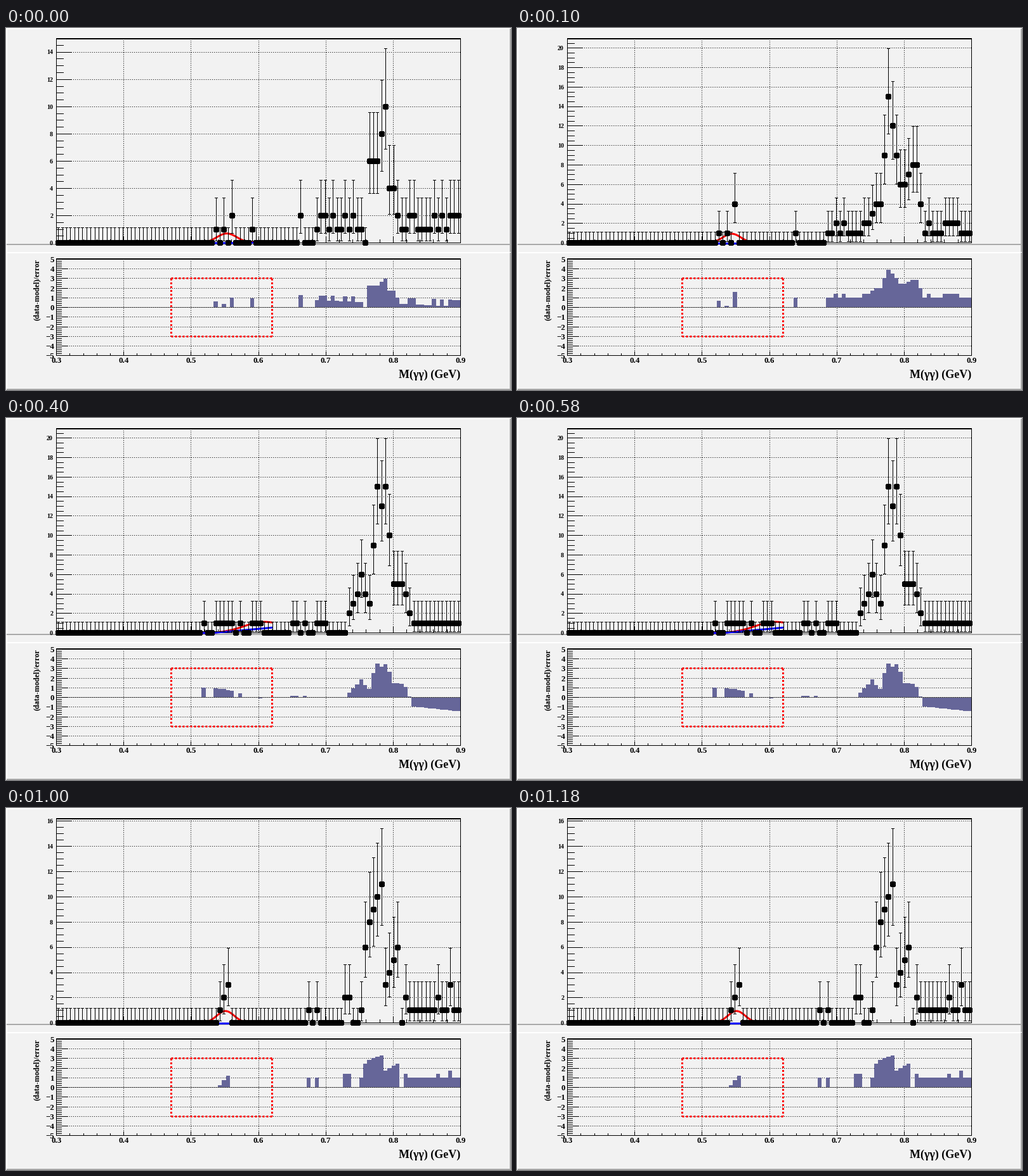
Recreate the animation shown at these times as a matplotlib script. Size 796 px wide and 572 px high, loop 1300 ms.

```python
import numpy as np
import matplotlib.pyplot as plt
from matplotlib.animation import FuncAnimation
from matplotlib.collections import EllipseCollection, LineCollection
from matplotlib.patches import Rectangle

W, H, DPI = 796, 572, 64
PAD_A, PAD_B = 0.6 * H, 0.62 * H      # end of upper pad, start of lower pad
LEFT, RIGHT = 0.1 * W, 0.9 * W
TOP, ZERO = 0.05 * PAD_A, 0.99 * PAD_A
RES_TOP, RES_BOT = PAD_B + 0.05 * (H - PAD_B), PAD_B + 0.75 * (H - PAD_B)
RES_ZERO, RES_UNIT = (RES_TOP + RES_BOT) / 2, (RES_BOT - RES_TOP) / 10
BINS = 100
STEP = (RIGHT - LEFT) / BINS
FIT_LO, FIT_HI = 0.47, 0.62
DOTTED = (0, (1, 2))

plt.rcParams["font.family"] = "Liberation Serif"
plt.rcParams["font.weight"] = "bold"

fig = plt.figure(figsize=(W / DPI, H / DPI), dpi=DPI, facecolor="#f2f2f2")
ax = fig.add_axes([0, 0, 1, 1])
ax.set(xlim=(0, W), ylim=(H, 0))
ax.axis("off")


def px(n):
    return n * 72 / DPI


def mid(v):
    """Centre of the pixel that holds v."""
    return np.floor(v) + 0.5


def mass_x(m):
    return LEFT + (m - 0.3) / 0.6 * (RIGHT - LEFT)


def segs(lines, width=1, color="black", z=3, ls="solid"):
    art = LineCollection(lines, linewidths=px(width), colors=color,
                         linestyles=[ls], zorder=z)
    art.set_snap(False)
    return ax.add_collection(art, autolim=False)


def rect(x, y, w, h, color):
    ax.add_patch(Rectangle((x, y), w, h, fc=color, lw=0, zorder=0))


def label(x, y, s, size, ha="right", **kw):
    return ax.text(x, y, s, fontsize=px(size), ha=ha, va="baseline",
                   zorder=4, **kw)


def hline(x0, x1, y):
    return [(x0, mid(y)), (x1, mid(y))]


def vline(x, y0, y1):
    return [(mid(x), y0), (mid(x), y1)]


def bevel(y0, y1):
    light, dark = "#ffffff", "#a9a9a9"
    rect(0, y0, W, 2, light)
    rect(0, y0, 2, y1 - y0, light)
    rect(1, y1 - 2, W - 1, 2, dark)
    rect(W - 2, y0 + 1, 2, y1 - y0 - 1, dark)


def panel(top, bottom, major, minor):
    """Frame, mass ticks and vertical grid."""
    top, bottom = int(top), int(bottom)
    x0, x1 = int(LEFT), int(RIGHT) + 1
    rect(x0, top - 1, x1 - x0, 2, "black")
    segs([hline(x0, x1, bottom), vline(LEFT, top, bottom),
          vline(RIGHT, top, bottom)])
    segs([vline(mass_x(0.3 + 0.02 * k), bottom - (minor if k % 5 else major),
                bottom) for k in range(31)])
    segs([vline(mass_x(0.3 + 0.1 * k), top, bottom) for k in range(1, 6)],
         z=1, ls=DOTTED)


def draw_static():
    bevel(0, H)
    bevel(0, int(PAD_A))
    bevel(int(PAD_B), H)
    panel(TOP, ZERO, 10, 5)
    panel(RES_TOP, RES_BOT, 6, 3)

    segs([hline(80, RIGHT, RES_ZERO)], color="#777777")
    for v in range(-5, 6):
        y = RES_ZERO - RES_UNIT * v
        label(76, y + 4.5, str(v).replace("-", "\u2212"), 13)
        if abs(v) < 5:
            segs([hline(79, RIGHT, y)], z=1 if v else 3.5, ls=DOTTED)
    segs([hline(79, 79 + (9 if k % 5 else 18), RES_ZERO - RES_UNIT * k / 5)
          for k in range(-25, 26)])

    for k in range(3, 10):
        label(mass_x(k / 10), 529, f"0.{k}", 13, ha="center")
    label(716.5, 553, "M(\u03b3\u03b3) (GeV)", 18)
    label(51.5, 365, "(data-model)/error", 12, rotation=90,
          rotation_mode="anchor")

    x0, x1 = mid(mass_x(FIT_LO)), mid(mass_x(FIT_HI))
    y0, y1 = RES_ZERO - 3 * RES_UNIT, RES_ZERO + 3 * RES_UNIT
    segs([hline(x0, x1, y0), hline(x0, x1, y1),
          vline(x0, y0, y1), vline(x1, y0, y1)],
         width=3, color="red", z=5, ls=(0, (1, 1)))


def poisson_range(n):
    """Central 68% interval for a count."""
    if n == 0:
        return 0, 1.148
    u = n + 1
    low = n * (1 - 1 / (9 * n) - 1 / (3 * n ** 0.5)) ** 3
    high = u * (1 - 1 / (9 * u) + 1 / (3 * u ** 0.5)) ** 3
    return low, high


def make_counts(events, floor_from, extra, peak, seed):
    """Single events, a noisy floor of ones, and a peak through key points."""
    rng = np.random.default_rng(seed)
    bins = np.arange(BINS)
    counts = np.bincount(events, minlength=BINS)
    counts[floor_from:] = 1 + rng.poisson(extra, BINS - floor_from)
    at, height = zip(*peak)
    inside = (bins >= at[0]) & (bins <= at[-1])
    counts[inside] = np.rint(np.interp(bins[inside], at, height))
    return counts


def draw_run(counts, signal, slope=(0.9, 0, 0)):
    """Draw one data set and return its artists."""
    amp, mu, sigma = signal
    start, lin, quad = slope

    def background(m):
        d = np.maximum(m - start, 0)
        return lin * d + quad * d * d

    def model(m):
        return background(m) + amp * np.exp(-((m - mu) / sigma) ** 2 / 2)

    spans = [poisson_range(n) for n in counts]
    y_max = 1.05 * max(hi for _, hi in spans)
    unit = (ZERO - TOP) / y_max
    arts = []

    # scale
    ticks, grid = [], []
    for k in range(int(y_max * 2) + 1):
        y = ZERO - unit * k / 2
        ticks.append(hline(79, 79 + (12 if k % 4 else 25), y))
        if k % 4 == 0:
            arts.append(label(74, y + 3.3, str(k // 2), 10))
            if k:
                grid.append(hline(79, RIGHT, y))
    arts += [segs(ticks), segs(grid, z=1, ls=DOTTED)]

    # fit
    m = np.linspace(FIT_LO, FIT_HI, 120)
    for f, color in ((model, "red"), (background, "blue")):
        arts += ax.plot(mass_x(m), ZERO - unit * f(m), color=color,
                        lw=px(3), zorder=4)

    # data with errors
    cx = mid(LEFT + STEP * (np.arange(BINS) + 0.5))
    cy = mid(ZERO - unit * counts)
    bars = []
    for x, n, (lo, hi) in zip(cx, counts, spans):
        y0, y1 = mid(ZERO - unit * lo), mid(ZERO - unit * hi)
        bars += [vline(x, y0, y1), hline(x - 2.5, x + 2.5, y1)]
        if n:
            bars.append(hline(x - 2.5, x + 2.5, y0))
    arts.append(segs(bars, z=5))
    size = np.full(BINS, 9.0)
    dots = EllipseCollection(size, size, 0 * size, units="xy",
                             offsets=np.c_[cx, cy],
                             offset_transform=ax.transData, facecolors="black",
                             linewidths=0, antialiaseds=False, zorder=6)
    dots.set_snap(False)
    arts.append(ax.add_collection(dots, autolim=False))

    # residuals
    used = np.flatnonzero(counts)
    n = counts[used]
    pull = (n - model(0.3 + 0.006 * (used + 0.5))) / np.sqrt(n)
    x0, x1 = np.floor(LEFT + STEP * used), np.floor(LEFT + STEP * (used + 1))
    base = int(RES_ZERO)
    tops = np.floor(RES_ZERO - RES_UNIT * pull)
    arts += ax.bar(x0, tops - base, x1 - x0, bottom=base, align="edge",
                   color="#666699", lw=0, zorder=2)
    return arts


draw_static()
runs = [
    draw_run(make_counts([39, 41, 43, 43, 48, 60, 60], 64, 0.4,
                         [(76, 0), (77, 6), (79, 6), (81, 10), (82, 4), (83, 4)], 1),
             (0.7, 0.553, 0.015), (0.58, 2.3, 2.3)),
    draw_run(make_counts([37, 39, 41, 41, 41, 41, 56], 64, 0.4,
                         [(73, 2), (77, 4), (78, 9), (79, 15), (82, 6), (86, 8),
                          (88, 1)], 2),
             (0.95, 0.544, 0.0135)),
    draw_run(make_counts(np.r_[36, 39:44, 45, 48:51, 58, 59, 61, 64:67], 88, 0,
                         [(71, 0), (75, 6), (77, 3), (79, 15), (80, 13), (81, 15),
                          (83, 5), (85, 5), (88, 1)], 3),
             (0.68, 0.603, 0.024), (0.53, 6, 2)),
    draw_run(make_counts([33, 40, 40, 43, 43, 45, 55, 58, 68, 71, 71, 73, 73], 90, 0,
                         [(74, 0), (77, 3), (78, 6), (79, 6), (80, 11), (83, 2),
                          (89, 2)], 4),
             (0.65, 0.547, 0.019)),
    draw_run(make_counts([40, 41, 41, 42, 42, 42, 62, 64, 71, 71, 72, 72], 86, 0.3,
                         [(75, 1), (76, 6), (78, 9), (80, 11), (81, 3), (84, 6),
                          (85, 0)], 5),
             (0.95, 0.551, 0.013)),
]


def show(k):
    """The first run lasts one tick, the others three each."""
    now = (k + 2) // 3
    for i, arts in enumerate(runs):
        for art in arts:
            art.set_visible(i == now)
    return []


show(0)
anim = FuncAnimation(fig, show, frames=13, interval=100, repeat=True,
                     repeat_delay=0, blit=False)
plt.show()
```
